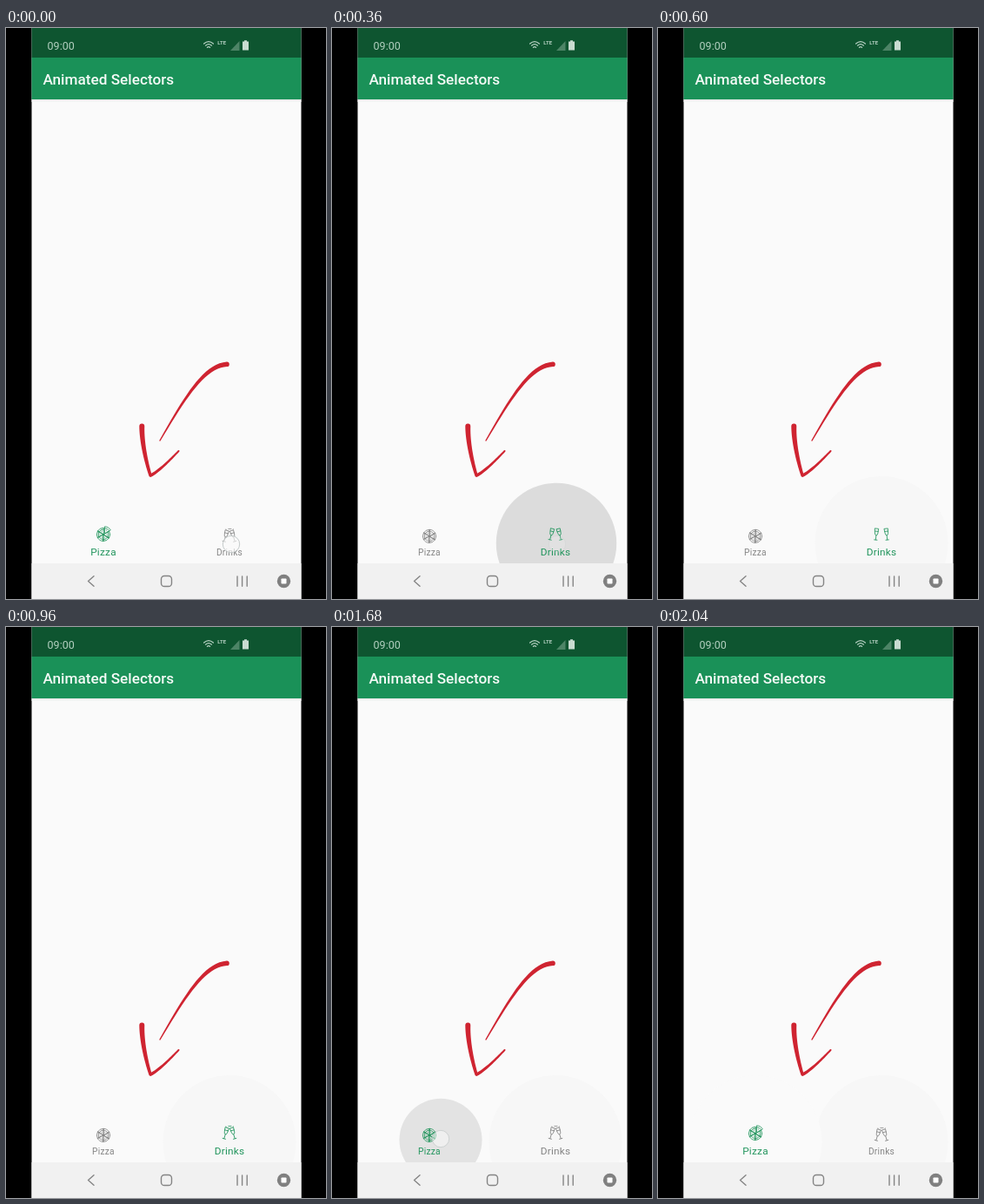
Write an HTML page that moves like this. It is 368 by 656 pixels and loops after 2.52 s.

```html
<!DOCTYPE html>
<html lang="en">
<head>
<meta charset="utf-8">
<title>Animated Selectors</title>
<style>
  html, body { margin: 0; width: 100%; height: 100%; overflow: hidden; background: #000; }
  svg { display: block; width: 100%; height: 100%; font-family: Roboto, sans-serif; }
  .line { fill: none; stroke-linecap: round; stroke-linejoin: round; }
  .label { text-anchor: middle; letter-spacing: .25px; }
</style>
</head>
<body>
<svg viewBox="0 0 368 656">
  <defs>
    <linearGradient id="shade" x2="0" y2="1">
      <stop stop-color="#e2e6e4"/><stop offset="1" stop-color="#fafafa"/>
    </linearGradient>
    <clipPath id="content"><rect x="29.5" y="82" width="310" height="533"/></clipPath>
    <path id="wedge" d="M0 0V-7.6A7.6 7.6 0 0 1 6.6-3.8ZM0-5.8A5.8 5.8 0 0 1 5-2.9M1.8-3.2H2"/>
    <path id="glass" d="M-2-6.5H2L1.7-1Q1.4 1.3 0 1.3T-1.7-1ZM0 1.3V6.3M-1.7 6.5H1.7M-1.8-3.4H1.8"/>
  </defs>

  <rect width="368" height="656"/>
  <rect x="29.5" width="310" height="656" fill="#fafafa"/>
  <rect x="29.5" y="82" width="310" height="3" fill="url(#shade)"/>
  <rect x="29.5" width="310" height="34" fill="#0e5530"/>
  <rect x="29.5" y="34" width="310" height="48" fill="#1a9158"/>
  <text x="47.6" y="25" font-size="12.5" fill="#b2cfbf">09:00</text>
  <text x="42.5" y="65" font-size="17.2" font-weight="500" fill="#f4faf6">Animated Selectors</text>

  <path class="line" stroke="#b8d2c4" stroke-width="1.2"
    d="M227.6 18Q233 13.2 238.4 18M229.5 20.2Q233 17.2 236.5 20.2M231.4 22.3Q233 21 234.6 22.3"/>
  <text x="243.3" y="19.4" font-size="6" font-weight="700" fill="#b8d2c4">LTE</text>
  <path fill="#4d8466" d="M258 26L268.5 15V26Z"/>
  <path fill="#c9dcd1" d="M272 15.6H274V14.2H277V15.6H279V25.5H272Z"/>

  <g clip-path="url(#content)">
    <circle id="trace" cx="257" cy="591.5" r="76.5" fill="#f7f7f7"/>
    <circle id="wipe" cx="112" cy="591.5" r="76.5" fill="#fafafa"/>
    <circle id="ripple"/>
  </g>

  <path id="arrow" fill="#cf2431"/>

  <g id="pizza" class="line" stroke-width=".8"></g>
  <g id="drinks" class="line" stroke-width=".8">
    <use id="left" href="#glass"/>
    <use id="right" href="#glass"/>
    <path id="spark" d="M-1.2-8.2H2M-3.6-7.4L-4-7.7M4-7.4L4.5-7.7"/>
  </g>
  <text id="pizzaLabel" class="label" x="112" y="606">Pizza</text>
  <text id="drinksLabel" class="label" x="257" y="606">Drinks</text>

  <circle id="touch" r="9.7" fill="#fafafa" fill-opacity=".65" stroke="#c5cbcb"/>

  <rect x="29.5" y="615" width="310" height="41" fill="#f1f1f1"/>
  <g class="line" stroke="#858585" stroke-width="1.4">
    <path d="M101 629.8L94.5 635.5L101 641.2M266 630v11.3m5.6 0v-11.3m5.6 0v11.3"/>
    <rect x="178.5" y="629.5" width="12" height="12" rx="3.6"/>
  </g>
  <circle cx="319.5" cy="635.5" r="7.7" fill="#808080"/>
  <rect x="316.5" y="632.5" width="6" height="6" rx=".8" fill="#fff"/>
</svg>
<script>
  const LOOP = 2520, STEP = 120;
  const GREEN = '#22955d', GREY = '#858585';
  const TAPS = [
    { down: 0, up: 240, x: 259, y: 593, item: 257 },
    { down: 1560, up: 1680, x: 125, y: 588, item: 112 }
  ];

  const el = id => document.getElementById(id);
  const set = (id, attrs) => {
    for (const name in attrs) el(id).setAttribute(name, attrs[name]);
  };
  const show = (id, on) => set(id, { visibility: on ? 'visible' : 'hidden' });
  const mix = (a, b, k) => a + (b - a) * k;
  const ramp = (t, from, span) => Math.min(1, Math.max(0, (t - from) / span));

  // Brush stroke along a cubic curve, its width going from w0 to w1.
  function brush(p0, p1, p2, p3, w0, w1) {
    const near = [], far = [], n = 20;
    for (let i = 0; i <= n; i++) {
      const k = i / n, m = 1 - k;
      const at = a => m * m * m * p0[a] + 3 * m * m * k * p1[a] + 3 * m * k * k * p2[a] + k * k * k * p3[a];
      const slope = a => m * m * (p1[a] - p0[a]) + 2 * m * k * (p2[a] - p1[a]) + k * k * (p3[a] - p2[a]);
      const half = mix(w0, w1, k) / 2 / Math.hypot(slope(0), slope(1));
      const dx = -slope(1) * half, dy = slope(0) * half;
      near.push(`${at(0) + dx} ${at(1) + dy}`);
      far.unshift(`${at(0) - dx} ${at(1) - dy}`);
    }
    const cap = w => `A${w / 2} ${w / 2} 0 0 0 `;
    return `M${near.join('L')}${cap(w1)}${far.join('L')}${cap(w0)}${near[0]}Z`;
  }

  set('arrow', {
    d: brush([254, 386.3], [228, 388], [206, 424], [177, 474], 5.6, 1.4) +
       brush([156.3, 457.5], [156, 475], [161, 498], [166, 514], 6, 3.4) +
       brush([166.5, 514], [176, 509], [188, 497], [198.5, 486], 3.6, 2)
  });

  el('pizza').innerHTML = [0, 1, 2, 3, 4, 5]
    .map(i => `<use href="#wedge" transform="rotate(${60 * i})"/>`).join('');
  el('pizza').firstChild.id = 'slice';

  function drawTap(t) {
    const tap = TAPS[t < TAPS[1].down ? 0 : 1];
    const age = t - tap.up;
    const grow = ramp(age, -150, 390);
    const fade = 1 - ramp(age, 120, 240);
    set('ripple', {
      cx: mix(tap.x, tap.item, ramp(age, 0, 240)),
      cy: mix(tap.y, 591.5, grow),
      r: 76.5 * (1 - (1 - grow) ** 2),
      'fill-opacity': .12 * Math.min(1, 2 * grow) * fade
    });
    set('touch', { cx: tap.x, cy: tap.y, opacity: 1 - ramp(age, -60, 240) });
  }

  function drawItem(name, x, y, on, lift) {
    const color = on ? GREEN : GREY;
    set(name, { stroke: color, transform: `translate(${x} ${y - 2 * lift})` });
    set(name + 'Label', { fill: color, 'font-size': mix(10.2, 11.8, lift) });
  }

  function draw(t) {
    const drinksOn = t >= TAPS[0].up && t < TAPS[1].up;
    const drinks = ramp(t, 240, 120) - ramp(t, 1680, 240);
    const slice = 1.5 * (1 - drinks);
    const swing = Math.sin(Math.PI * ramp(t, 240, 720)) ** 2;
    const gap = 4.4 + 1.6 * swing, tilt = 16 - 10 * swing;

    show('trace', t >= 600);
    show('wipe', t >= 1800);
    drawTap(t);
    drawItem('pizza', 112, 583.9, !drinksOn, 1 - drinks);
    drawItem('drinks', 257, 583.6, drinksOn, drinks);
    set('slice', { transform: `translate(${slice} ${-slice})` });
    set('left', { transform: `translate(${-gap} 0) rotate(${tilt})` });
    set('right', { transform: `translate(${gap} 0) rotate(${-tilt})` });
    show('spark', t < 240 || t >= 960);
  }

  const start = performance.now();
  function tick() {
    const t = (performance.now() - start) % LOOP;
    draw(Math.floor(t / STEP) * STEP);
    requestAnimationFrame(tick);
  }
  tick();
</script>
</body>
</html>
```
